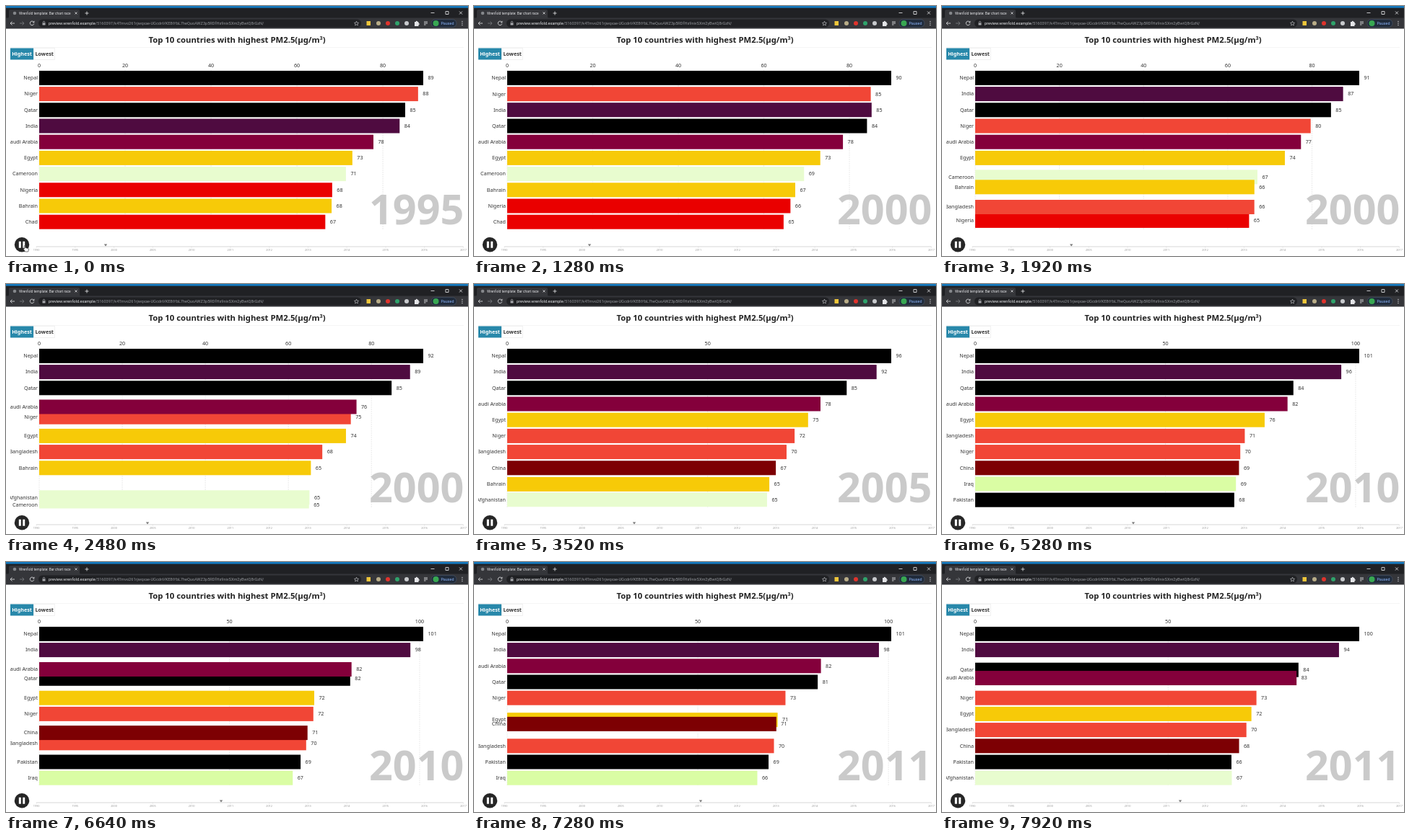
Write an HTML page that moves like this. It is 640 by 347 pixels and loops after 8000 ms.

```html
<!DOCTYPE html>
<html lang="en">
<head>
<meta charset="utf-8">
<title>Bar chart race</title>
<style>
  html, body { margin: 0; width: 100%; height: 100%; overflow: hidden; background: #fff; }
  svg { display: block; width: 100vw; height: 100vh; font-family: "Noto Sans", "Open Sans", sans-serif; }
  .chart { font-size: 7.15px; fill: #333; }
  .mid { text-anchor: middle; }
  .end { text-anchor: end; }
  .bold { font-weight: 700; }
  .ui { font-family: Roboto, sans-serif; }
  .line { fill: none; stroke: #d6d7da; stroke-width: .9; }
</style>
</head>
<body>
<svg viewBox="0 0 640 347" preserveAspectRatio="none">
  <defs><clipPath id="plot"><rect x="6" y="76" width="628" height="235.5"/></clipPath></defs>
  <rect width="640" height="347" fill="#fff"/>

  <!-- browser window -->
  <g class="ui">
    <rect width="640" height="17" fill="#202124"/>
    <rect width="640" height="2.7" fill="#1478bd"/>
    <path d="M2 17q2 0 2-2V7q0-2 2-2h94q2 0 2 2v8q0 2 2 2z" fill="#35363a"/>
    <rect y="16.5" width="640" height="15" fill="#35363a"/>
    <circle cx="12" cy="10" r="2.3" fill="#85878b"/>
    <text x="18" y="11.8" font-size="4.8" fill="#e4e5e8">Wrenfold template: Bar chart race</text>
    <path class="line" d="M95.5 8.4l3 3m0-3l-3 3M109.5 10h5m-2.5-2.500v5M588.500 9.500h5M609 7.500h4v4h-4zM628 7.500l4 4m0-4l-4 4"/>
    <path class="line" d="M12 24H6m2.500-2.500L6 24l2.500 2.500"/>
    <path class="line" d="M19 24h6m-2.500-2.500L25 24l-2.500 2.500" style="stroke:#77797d"/>
    <path class="line" d="M38.500 22.500a2.800 2.800 0 1 0 .3 2M39 20.800v2h-2"/>
    <rect x="45" y="18.500" width="447" height="11" rx="5.500" fill="#202124"/>
    <rect x="50.500" y="23.500" width="4" height="3" fill="#a7a9ad"/>
    <path class="line" d="M51.300 23.500v-1a1.200 1.200 0 0 1 2.400 0v1" style="stroke-width:.6"/>
    <text x="59" y="26" font-size="5.6" fill="#e8eaed">preview.wrenfold.example<tspan fill="#94979c">/5160397/k4Tmvo261rjwqxae-UGcdnVKE8tYbL7heQuoAWZ3p5RDfHs9nivSXm2yBwtQ8rGzN/</tspan></text>
    <path class="line" d="M485.500 21.200l.9 2 2.100.2-1.600 1.400.5 2.100-1.900-1.100-1.900 1.100.5-2.100-1.600-1.400 2.100-.2z" style="stroke-width:.6"/>
    <rect x="499.500" y="21" width="5.500" height="6" fill="#f0c63a"/>
    <circle cx="516" cy="24" r="3" fill="#b9ad88"/>
    <circle cx="529" cy="24" r="3" fill="#e0332c"/>
    <circle cx="542" cy="24" r="3" fill="#2fa36b"/>
    <circle cx="555" cy="24" r="3" fill="#c9cbce"/>
    <path d="M566 22h1.700a1.200 1.200 0 0 1 2.400 0h1.400v1.700a1.200 1.200 0 0 1 0 2.400V28H566z" fill="#e4e5e8"/>
    <path class="line" d="M579 22h5m-5 2h5m-5 2h2.500"/>
    <rect x="589" y="18.500" width="35" height="11" rx="5.500" fill="#202b3b" stroke="#526174" stroke-width=".5"/>
    <circle cx="595.500" cy="24" r="4" fill="#38a852"/>
    <text x="602.500" y="26" font-size="5.4" fill="#8ab4f8">Paused</text>
    <g fill="#d6d7da"><circle cx="632" cy="21.500" r=".7"/><circle cx="632" cy="24" r=".7"/><circle cx="632" cy="26.500" r=".7"/></g>
  </g>

  <!-- page -->
  <text class="mid bold" x="320" y="51" font-size="11.3" fill="#222">Top 10 countries with highest PM2.5(µg/m<tspan font-size="7.2" dy="-4">3</tspan><tspan dy="4">)</tspan></text>
  <path d="M6 57.500H634" stroke="#eee" stroke-width=".6"/>
  <rect x="6" y="58.500" width="32" height="16" fill="#2888aa"/>
  <rect x="38.250" y="58.750" width="29.500" height="15.500" fill="#fff" stroke="#e4e4e4" stroke-width=".5"/>
  <g class="chart mid bold">
    <text x="22" y="69" style="fill:#fff">Highest</text>
    <text x="53.200" y="69">Lowest</text>
  </g>
  <g id="ticks" class="chart mid"></g>
  <text id="year" class="end bold" x="634.500" y="303" font-size="57.500" fill="#cacaca"></text>
  <g id="bars" class="chart" clip-path="url(#plot)"></g>

  <!-- timeline -->
  <path d="M42 334H633.500" stroke="#ccc" stroke-width=".8"/>
  <g id="years" class="mid" font-size="3.8" fill="#999"></g>
  <path id="head" d="M-2.200 -1.300h4.400L0 1.700z" fill="#777"/>
  <circle cx="22" cy="331.200" r="10.200" fill="#262626"/>
  <path d="M17.800 326.700h3v9h-3zM23.200 326.700h3v9h-3z" fill="#fff"/>
  <path id="hand" d="M25 333q1-1 1.700 0v2.500l4 1q1 .3.800 1.500l-.8 3h-4l-2.500-3.500q0-1.200 1.300-.5z" fill="#fff" stroke="#222" stroke-width=".6"/>
</svg>
<script>
const LOOP = 8000, STEP = 80;
const LEFT = 46, SPAN = 532, TOP = 99.9, ROW = 22.2, BAR = 20;
const ROWS = 10, PARK = 11.3;
const EASE = 9;      // timeline pixels a bar takes to change rows
const YEARS = [1990, 1995, 2000, 2005, 2010, 2011, 2012, 2013, 2014, 2015, 2016, 2017];
const yearX = i => 42 + i * 53.77;

// time in ms, timeline position
const HEAD = [[0, 138], [80, 140], [400, 140], [480, 143], [640, 149], [1040, 149], [1120, 154],
  [1280, 160], [2480, 196], [3520, 222], [5280, 265], [6640, 298], [7920, 330]];

// values at these timeline positions; later rows are painted on top
const KNOTS = [138, 149.5, 203, 257, 311, 330];
const DATA = [
  ["Nepal", "#000", [89.4, 89, 93, 100.95, 100.95, 99.55]],
  ["Niger", "#f14636", [88.2, 87.9, 73.1, 69.1, 73, 72.9]],
  ["Qatar", "#000", [85.2, 83.9, 85, 84.1, 81, 83.8]],
  ["India", "#4f0b40", [83.9, 84, 90.1, 95.9, 98.1, 94.3]],
  ["Saudi Arabia", "#84003b", [77.8, 79.1, 76, 82.1, 82.1, 83.3]],
  ["Egypt", "#f7ca08", [72.9, 73, 74, 77, 70.8, 71.6]],
  ["Cameroon", "#e8fccf", [71.4, 70.7, 64.1, 61, 60, 60], -.9],
  ["Nigeria", "#ea0000", [68.2, 66.86, 63.6, 60, 59, 59]],
  ["Bahrain", "#f7ca08", [68.07, 67.9, 65.05, 66, 62, 61]],
  ["Chad", "#ea0000", [66.6, 65.6, 60.6, 58, 57, 57]],
  ["Bangladesh", "#f14636", [62, 63, 68.95, 71.03, 69.9, 70.3]],
  ["China", "#7d0003", [58, 59.2, 65.9, 69.05, 71, 68.4]],
  ["Afghanistan", "#e8fccf", [59, 60.3, 65.8, 63, 65, 66.52]],
  ["Iraq", "#dafda4", [56, 57, 60, 69, 65.9, 64]],
  ["Pakistan", "#000", [57, 58, 61, 67.95, 68.95, 66.42]]
].map(([name, color, values, bias = 0]) =>
  ({ name, color, bias, curve: KNOTS.map((x, i) => [x, values[i]]) }));

const $ = id => document.getElementById(id);

function add(parent, tag, attrs, text) {
  const el = document.createElementNS("http://www.w3.org/2000/svg", tag);
  set(el, attrs);
  if (text !== undefined) el.textContent = text;
  return parent.appendChild(el);
}

function set(el, attrs) {
  for (const key in attrs) el.setAttribute(key, attrs[key]);
}

function lerp(points, x) {
  if (x <= points[0][0]) return points[0][1];
  for (let i = 1; i < points.length; i++) {
    const [x0, y0] = points[i - 1], [x1, y1] = points[i];
    if (x <= x1) return y0 + (y1 - y0) * (x - x0) / (x1 - x0);
  }
  return points[points.length - 1][1];
}

YEARS.forEach((y, i) => {
  add($("years"), "path", { d: `M${yearX(i)} 334v1.5`, stroke: "#ccc", "stroke-width": .5 });
  add($("years"), "text", { x: yearX(i), y: 340 }, y);
});

const ticks = Array.from({ length: 6 }, () => {
  const g = add($("ticks"), "g", {});
  add(g, "path", { d: "M0 89V311", stroke: "#ddd", "stroke-width": .6, "stroke-dasharray": "2 1" });
  return { g, label: add(g, "text", { y: 85 }) };
});

for (const d of DATA) {
  d.g = add($("bars"), "g", {});
  d.rect = add(d.g, "rect", { x: LEFT, y: -BAR / 2, height: BAR, fill: d.color });
  add(d.g, "text", { class: "end", x: 44, y: 2.3 }, d.name);
  d.label = add(d.g, "text", { y: 2.3 });
}

function rowsAt(x) {
  const score = DATA.map(d => lerp(d.curve, x) + d.bias);
  return score.map(s => {
    const rank = score.filter(o => o > s).length;
    return rank < ROWS ? rank : PARK;
  });
}

// Ranks averaged with a triangular window: each swap eases in and out.
function easedRows(x) {
  const n = 40, sum = DATA.map(() => 0);
  for (let i = 0; i < n; i++) {
    const u = (i + .5) / n;
    const weight = 4 * Math.min(u, 1 - u) / n;
    rowsAt(x - EASE * u).forEach((r, k) => sum[k] += r * weight);
  }
  return sum;
}

function draw(t) {
  const x = lerp(HEAD, t);
  const values = DATA.map(d => lerp(d.curve, x));
  const max = Math.max(...values), scale = SPAN / max;
  const gap = max / 3 > Math.sqrt(1000) ? 50 : 20;

  ticks.forEach(({ g, label }, i) => {
    set(g, {
      transform: `translate(${LEFT + i * gap * scale})`,
      visibility: i * gap <= max ? "visible" : "hidden"
    });
    label.textContent = i * gap;
  });

  const rows = easedRows(x);
  DATA.forEach((d, i) => {
    const width = values[i] * scale;
    set(d.g, { transform: `translate(0 ${TOP + rows[i] * ROW})` });
    set(d.rect, { width });
    set(d.label, { x: LEFT + width + 6.5 });
    d.label.textContent = Math.round(values[i]);
  });

  $("year").textContent = YEARS.filter((y, i) => yearX(i) <= x).pop();
  set($("head"), { transform: `translate(${x} 331.8)` });
  set($("hand"), { visibility: t < 480 ? "visible" : "hidden" });
}

let start, last = -1;
function frame(now) {
  start ??= now;
  const t = Math.floor((now - start) % LOOP / STEP) * STEP;
  if (t !== last) draw(last = t);
  requestAnimationFrame(frame);
}
draw(0);
requestAnimationFrame(frame);
</script>
</body>
</html>
```
